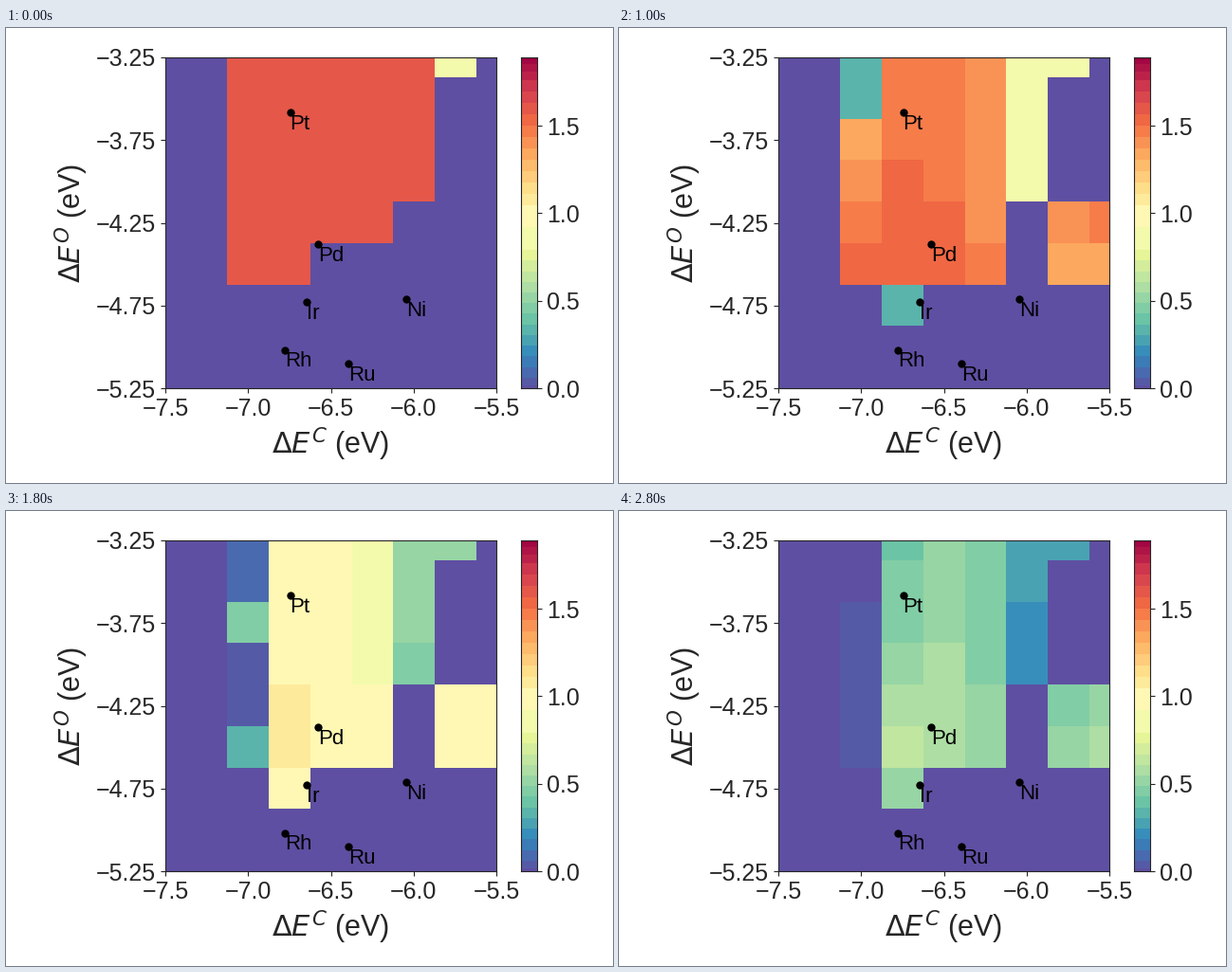
Animation of 640 by 480 pixels, one loop 3000 ms. Source, as a matplotlib script:

```python
import numpy as np
import matplotlib.pyplot as plt
from matplotlib.animation import FuncAnimation
from matplotlib.colors import BoundaryNorm, ListedColormap

W, H, DPI = 640, 480, 100
FRAMES, STEP_MS = 15, 200
VMAX = 1.89
PITCH = 0.2507  # cell size in eV
INK = "#262626"

plt.rcParams.update({
    "font.family": "Liberation Sans",
    "text.color": INK,
    "axes.labelcolor": INK,
    "axes.edgecolor": INK,
    "xtick.color": INK,
    "ytick.color": INK,
    "xtick.labelsize": 18,
    "ytick.labelsize": 18,
    "axes.labelsize": 22,
})

# Colour bands: even steps at both ends, two wide pale ones in the middle.
edges = np.r_[0, 0.015, np.linspace(0, 0.79, 14)[1:], 0.92,
              np.linspace(1.045, 1.76, 12), 1.81, 1.85, 1.875, VMAX]
levels = (edges[:-1] + edges[1:]) / 2
levels[0], levels[-1] = 0, VMAX
cmap = ListedColormap(plt.get_cmap("Spectral_r")(levels / VMAX))
norm = BoundaryNorm(edges, cmap.N, clip=True)


def smooth(x):
    return x * x * (3 - 2 * x)


ROW = np.arange(7)
# Share of the gain towards the fifth row; the last row falls back.
DEPTH = smooth(np.minimum(ROW, [5, 5, 5, 5, 5, 5, 3]) / 5)


def rates(i):
    """Grid of rates at step i; row 0 is the top row."""
    grid = np.zeros((7, 7))
    d = i - 5
    fall = 2.25 * (np.exp(-0.06 * d) - 1)

    # Left edge: the top fades fast, the rest drops in a line, the middle first.
    grid[:2, 0] = (0.74 - 0.09 * ROW[:2]) * 0.7 ** (i - 3)
    collapse = np.array([0, 0.4, 0.4, 0.075]) * max(d, 0)
    line = 1.35 + 0.05 * ROW[:4] - 0.22 * d - collapse
    grid[2:6, 0] = np.maximum(line, 0.03)

    # Main block: one shared decline, higher towards the bottom.
    drift = -0.013 * (i - 7) * (1 - DEPTH)
    grid[:, 1] = 1.437 + fall + 0.12 * DEPTH + drift
    grid[:6, 2] = 1.437 + fall + 0.078 * DEPTH[:6]
    grid[:6, 3] = 1.375 + fall + 0.09 * DEPTH[:6] ** 4

    # Weak column: slow decay with a short dip that is deepest at the top.
    low = (ROW[:4] / 3) ** 2
    dip = (0.44 - 0.19 * low) * np.exp(-(i - 3) ** 2)
    grid[:4, 4] = 0.84 * 0.88 ** d - 0.008 * d * low - dip
    grid[0, 5] = min(0.85, grid[0, 4])

    # Island on the right.
    grid[4, 5:] = np.array([1.41, 1.45]) + fall
    grid[5, 5:] = np.minimum(grid[4, 5:] + 0.05, 1.36)

    # Late cells switch on one after another.
    grid[5, 2] *= i >= 1
    grid[4, 5:] *= i >= 1
    grid[5, 3:] *= i >= 4
    grid[6, 1] *= np.clip(0.8 * i - 3.8, 0, 1)
    return np.clip(grid, 0, min(1.6 + 0.14 * i, 1.885))


def add_axes(x, y, w, h):
    """Axes placed in pixels from the top left corner."""
    return fig.add_axes([x / W, 1 - (y + h) / H, w / W, h / H])


fig = plt.figure(figsize=(W / DPI, H / DPI), dpi=DPI, facecolor="white")
ax = add_axes(168, 31, 349, 349)
ax.set_facecolor(cmap(0))
xs = -7.1258 + PITCH * np.arange(8)
ys = -3.1193 - PITCH * np.arange(8)
mesh = ax.pcolormesh(xs, ys, rates(0), cmap=cmap, norm=norm,
                     antialiased=False, edgecolors="none")
ax.set(xlim=(-7.5, -5.5), ylim=(-5.25, -3.25),
       xticks=np.arange(-7.5, -5.4, 0.5), yticks=np.arange(-5.25, -3.2, 0.5),
       xlabel=r"$\Delta E^C$ (eV)", ylabel=r"$\Delta E^O$ (eV)")

METALS = {"Pt": (-6.746, -3.585), "Pd": (-6.577, -4.379),
          "Ir": (-6.645, -4.730), "Ni": (-6.045, -4.713),
          "Rh": (-6.777, -5.020), "Ru": (-6.393, -5.102)}
for name, (x, y) in METALS.items():
    ax.plot(x, y, "o", color="black", ms=6, mew=0)
    ax.annotate(name, (x, y), xytext=(0, -12.6), textcoords="offset points",
                fontsize=16, color="black", va="baseline")

bar = add_axes(543, 31, 17, 349)
bar.pcolormesh([0, 1], edges, levels[:, None], cmap=cmap, norm=norm,
               antialiased=False, edgecolors="none")
bar.yaxis.tick_right()
bar.set(xlim=(0, 1), ylim=(0, VMAX), xticks=[], yticks=[0, 0.5, 1, 1.5])


def update(i):
    mesh.set_array(rates(i))
    return [mesh]


anim = FuncAnimation(fig, update, frames=FRAMES, interval=STEP_MS,
                     repeat=True, repeat_delay=0, blit=False)
plt.show()
```
